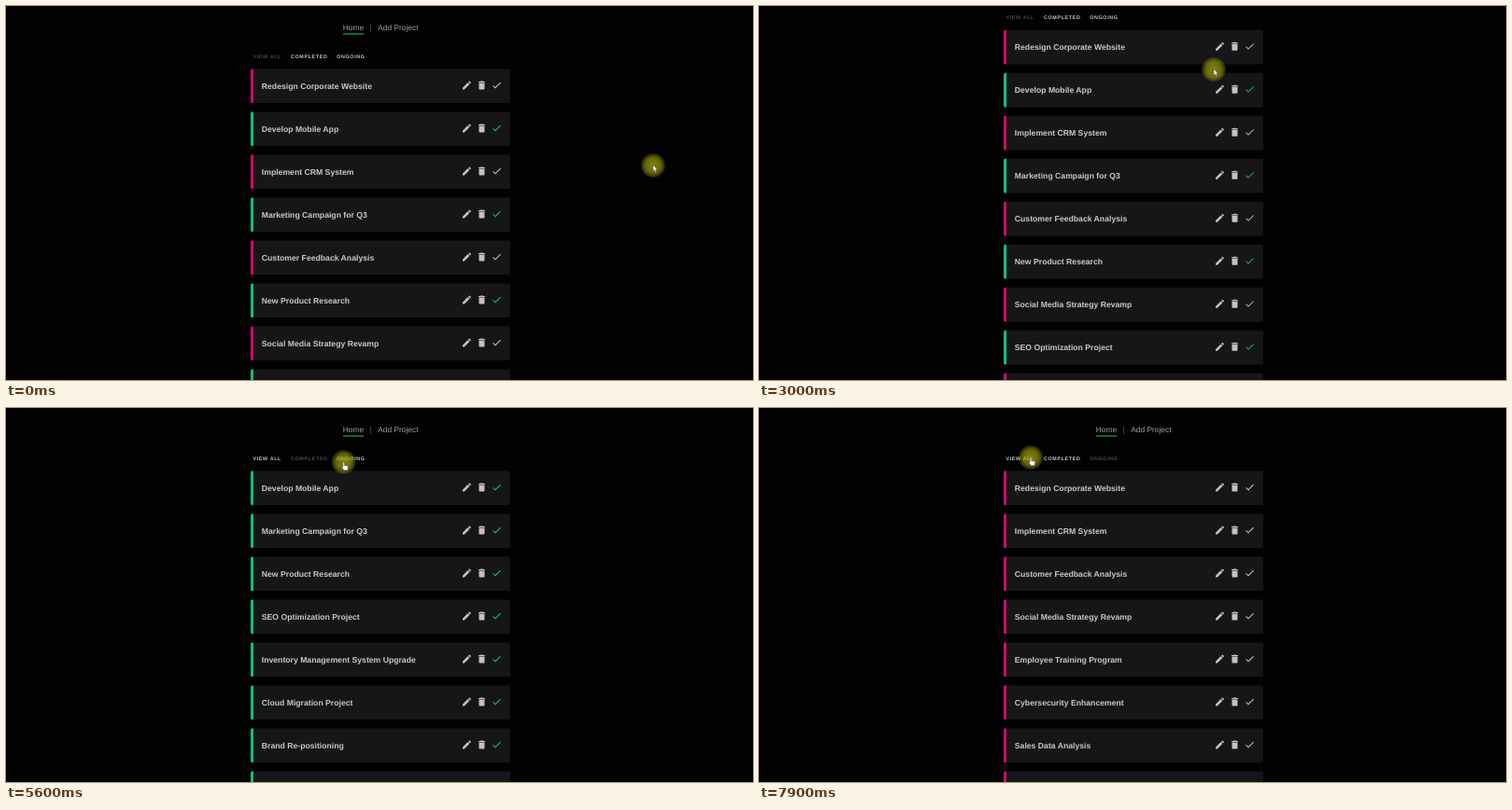
These frames come from a looping animation (800x401 px, 8 s). An HTML page:

```html
<!DOCTYPE html>
<html lang="en">
<head>
<meta charset="utf-8">
<title>Project list</title>
<style>
html, body { margin: 0; width: 100%; height: 100%; overflow: hidden; background: #020203; }
svg { display: block; width: 800px; height: 401px; }
text { font-family: "Liberation Sans", Arial, sans-serif; text-rendering: geometricPrecision; }
.nav { font-size: 8.4px; fill: #a0a0a0; }
.filter { font-size: 5.4px; font-weight: bold; letter-spacing: .62px; fill: #c9c9c9; }
.filter.on { fill: #4c4c4c; }
.title { font-size: 8.67px; font-weight: bold; fill: #c8c8c8; }
</style>
</head>
<body>
<svg viewBox="0 0 800 401">
  <defs>
    <radialGradient id="glow">
      <stop offset="0" stop-color="#b4b414" stop-opacity=".74"/>
      <stop offset=".6" stop-color="#a4a40e" stop-opacity=".62"/>
      <stop offset=".85" stop-color="#96960a" stop-opacity=".36"/>
      <stop offset="1" stop-color="#96960a" stop-opacity="0"/>
    </radialGradient>
    <g id="tools" fill="#c2c2c2">
      <path d="M3 17.25V21h3.75L17.81 9.94l-3.75-3.75zM20.71 7.04c.39-.39.39-1.02 0-1.41l-2.34-2.34c-.39-.39-1.02-.39-1.41 0l-1.83 1.83 3.75 3.75z"/>
      <path transform="translate(32)" d="M6 19c0 1.1.9 2 2 2h8c1.1 0 2-.9 2-2V7H6zM19 4h-3.5l-1-1h-5l-1 1H5v2h14z"/>
    </g>
    <path id="check" transform="translate(64)" d="M9 16.2L4.8 12l-1.4 1.4L9 19 21 7l-1.4-1.4z"/>
  </defs>
  <g id="page">
    <text class="nav" x="360.8" y="26">Home</text>
    <rect x="361" y="29.4" width="22" height="1.2" fill="#0eaa6c"/>
    <text class="nav" x="389.6" y="26" style="fill:#5c5c5c">|</text>
    <text class="nav" x="398.2" y="26">Add Project</text>
    <text class="filter" x="264.5" y="56">VIEW ALL</text>
    <text class="filter" x="305" y="56">COMPLETED</text>
    <text class="filter" x="354.2" y="56">ONGOING</text>
    <g id="list"></g>
  </g>
  <g id="pointer">
    <circle r="13.5" fill="url(#glow)"/>
    <g fill="#fff" stroke="#222" stroke-width=".4">
      <path id="arrow" d="M0-.5V6.3L1.5 5 2.6 7.4 3.7 6.9 2.6 4.6H4.7Z"/>
      <path id="hand" d="M-.8.4q.8-1 1.6 0V3.4l3 .7q1 .3.9 1.2L4.2 8.8H.3L-2.2 5.2q.3-1 1.4 0Z"/>
    </g>
  </g>
</svg>
<script>
const LOOP = 8000, STEP = 100, NOTCH = 41.67;
const $ = id => document.getElementById(id);

// Ongoing and completed projects alternate.
const projects = [
  "Redesign Corporate Website", "Develop Mobile App",
  "Implement CRM System", "Marketing Campaign for Q3",
  "Customer Feedback Analysis", "New Product Research",
  "Social Media Strategy Revamp", "SEO Optimization Project",
  "Employee Training Program", "Inventory Management System Upgrade",
  "Cybersecurity Enhancement", "Cloud Migration Project",
  "Sales Data Analysis", "Brand Re-positioning",
  "Customer Loyalty Program", "Email Marketing System Overhaul",
  "Competitor Analysis Study", "Website Accessibility Audit",
  "Office Relocation Plan", "Annual Report Design"
].map((name, i) => ({ name, done: i % 2 === 1 }));

const filters = [() => true, p => p.done, p => !p.done];
const labels = document.querySelectorAll(".filter");

// start, end, distance
const scrolls = [
  [2140, 2300, NOTCH], [3150, 3350, -NOTCH],
  [3970, 4120, NOTCH], [4380, 4500, -NOTCH],
  [6350, 6550, 2 * NOTCH], [6940, 7140, -2 * NOTCH]
];

// time, x, y, hand
const path = [
  [0, 693, 171], [100, 603, 127], [300, 603, 127], [400, 608, 106],
  [500, 616, 85], [600, 616, 85], [1200, 591, 78], [1300, 591, 78],
  [1800, 733, 77], [2200, 619, 72], [3000, 487, 68],
  [3500, 326, 56, 1], [3700, 324, 55, 1], [3800, 352, 52], [4100, 466, 43],
  [4900, 380, 62], [5100, 380, 62], [5500, 362, 58, 1], [5800, 361, 58, 1],
  [6000, 356, 63], [6400, 332, 90, 1], [6700, 320, 102, 1], [7000, 320, 102, 1],
  [7700, 290, 53, 1], [7900, 291, 53, 1], [8000, 291, 53, 1]
];

const smooth = u => (u = Math.min(1, Math.max(0, u)), u * u * (3 - 2 * u));

const scrollAt = t =>
  scrolls.reduce((sum, [a, b, d]) => sum + d * smooth((t - a) / (b - a)), 0);

function pointerAt(t) {
  const i = path.findLastIndex(k => k[0] <= t);
  const [a, x, y, hand] = path[i], [b, x2, y2] = path[i + 1];
  const u = (t - a) / (b - a);
  return { x: x + (x2 - x) * u, y: y + (y2 - y) * u, hand };
}

function card({ name, done }, i) {
  const color = done ? "#14bf7c" : "#cf0a6e";
  return `<g transform="translate(0 ${67.4 + 46 * i})">
    <rect x="262" width="278" height="36.7" rx="1.7" fill="#161618"/>
    <path d="M265 0h-1.3q-1.7 0-1.7 1.7v33.3q0 1.7 1.7 1.7h1.3z" fill="${color}"/>
    <text class="title" x="273.8" y="21.5">${name}</text>
    <g transform="translate(487.5 11.6) scale(.5)">
      <use href="#tools"/><use href="#check" fill="${done ? color : "#c2c2c2"}"/>
    </g></g>`;
}

let shown = -1;
function showFilter(n) {
  if (n === shown) return;
  shown = n;
  labels.forEach((el, i) => el.classList.toggle("on", i === n));
  $("list").innerHTML = projects.filter(filters[n]).map(card).join("");
}

function draw(now) {
  const t = Math.floor(now % LOOP / STEP) * STEP;
  showFilter(t < 3600 ? 0 : t < 5800 ? 1 : 2);
  $("page").setAttribute("transform", `translate(0 ${-scrollAt(t)})`);
  const { x, y, hand } = pointerAt(t);
  $("pointer").setAttribute("transform", `translate(${x} ${y})`);
  $("arrow").style.display = hand ? "none" : "";
  $("hand").style.display = hand ? "" : "none";
}

const start = performance.now();
function tick() {
  draw(performance.now() - start);
  requestAnimationFrame(tick);
}
tick();
</script>
</body>
</html>
```
